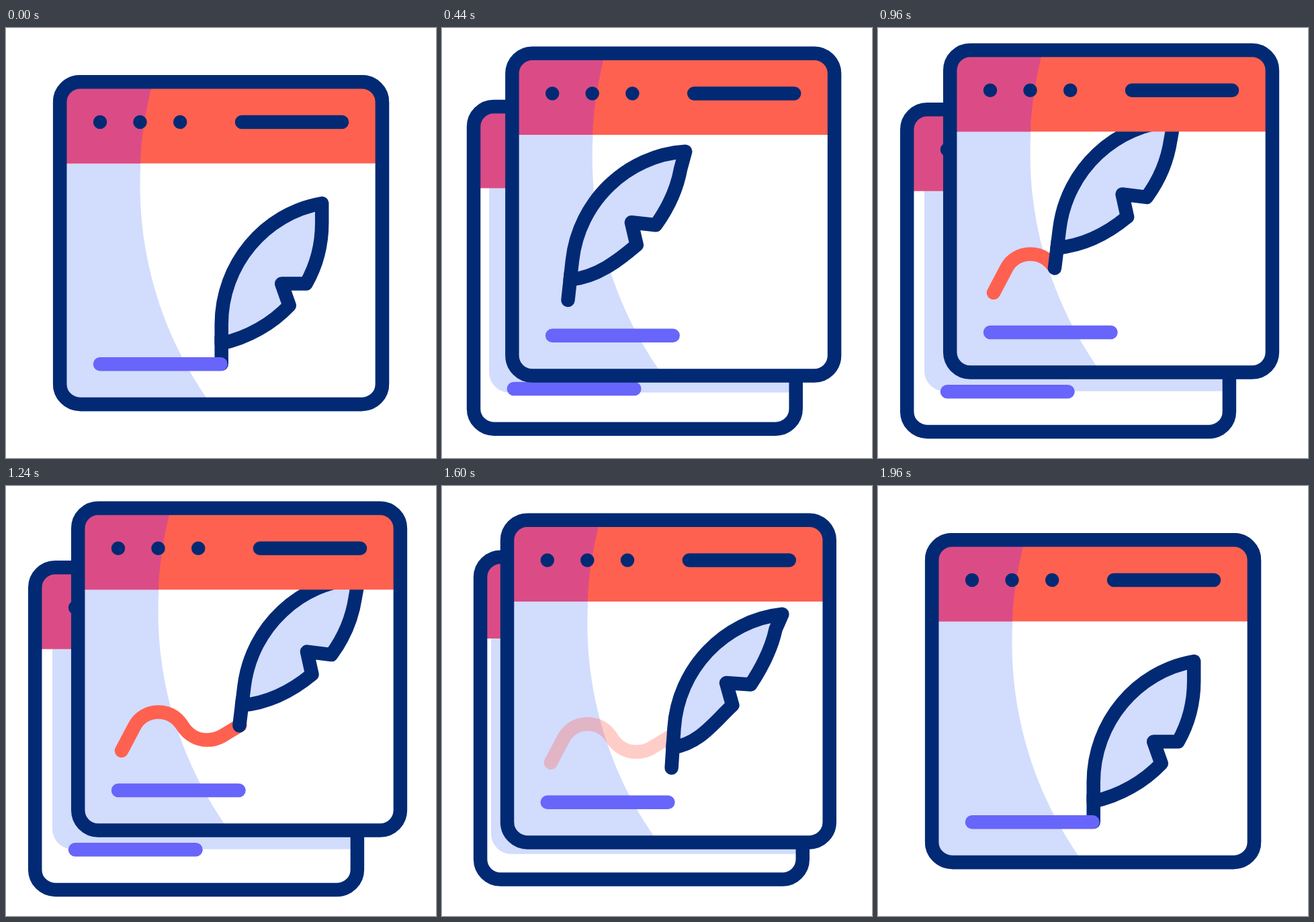
Write an HTML page that moves like this. It is 640x640 px and loops after 2000 ms.

```html
<!DOCTYPE html>
<html lang="en">
<head>
<meta charset="utf-8">
<title>Writing window</title>
<style>
  html, body { margin: 0; width: 100%; height: 100%; overflow: hidden; background: #fff; }
  svg { display: block; width: 100vw; height: 100vh; }
  .ink { stroke: #022a74; }
  .stroke { fill: none; stroke-width: 20.5; stroke-linecap: round; stroke-linejoin: round; }
  .pale { fill: #d2dcfd; }
</style>
</head>
<body>
<svg viewBox="0 0 640 640">
  <defs>
    <clipPath id="pane"><rect x="80" y="80" width="480" height="480" rx="30"/></clipPath>
    <g id="header" clip-path="url(#pane)">
      <path fill="#ff6150" d="M80 80H560V201.500H80Z"/>
      <path fill="#db4c86" d="M80 80H218.500L216 90C207 128 201 165 200 201.500H80Z"/>
    </g>
    <g id="chrome">
      <use href="#header"/>
      <path class="stroke ink" d="M140 140h0M199.500 140h0M259.200 140h0M351 140H500"/>
      <rect class="stroke ink" x="80.200" y="80.200" width="479.700" height="479.700" rx="30"/>
      <path class="stroke" stroke="#6865fa" d="M140 500.200H319.500"/>
    </g>
  </defs>

  <g id="back">
    <g clip-path="url(#pane)">
      <rect x="80" y="80" width="480" height="480" fill="#fff"/>
      <rect id="shadow" class="pale" x="80" y="80" width="480" height="480" rx="30"/>
    </g>
    <use href="#chrome"/>
  </g>

  <g id="front">
    <g clip-path="url(#pane)">
      <rect x="80" y="80" width="480" height="480" fill="#fff"/>
      <path class="pale" d="M80 80H218.500L216 90C205 138 199.500 186 199.500 235C199.500 350 236 460 298 550V560H80Z"/>
    </g>
    <path id="line" class="stroke" stroke="#ff6150" transform="translate(-27 47.300)"
      d="M172 394L191 358C198 344 212 336.500 226.500 336.500C242 336.500 254 344 262 356C270 369 283 378 299 378C307 378 315 376 322 372L360 349"/>
    <g id="pen">
      <path id="vane" class="stroke ink" style="fill:#d2dcfd"/>
      <path class="stroke ink" d="M0 0V-40"/>
    </g>
    <use href="#chrome"/>
  </g>
</svg>
<script>
  const LOOP = 2000;
  const [back, shadow, front, line, pen, vane] =
    ["back", "shadow", "front", "line", "pen", "vane"].map(id => document.getElementById(id));

  const REST = { x: 320.7, y: 500 };
  const total = line.getTotalLength();
  const first = line.getPointAtLength(0);
  const last = line.getPointAtLength(total);

  // Smooth 0..1 progress between two times
  const ease = (t, from, to) => {
    const u = Math.min(1, Math.max(0, (t - from) / (to - from)));
    return u * u * (3 - 2 * u);
  };
  const move = (el, x, y, more = "") =>
    el.setAttribute("transform", `translate(${x} ${y}) ${more}`);

  // Feather outline around the nib; (dx, dy) pulls the notched side inwards
  function featherPath(dx, dy) {
    const p = (x, y, k = 1) => `${x + dx * k} ${y + dy * k} `;
    return "M0 -30.5V-59C0 -148 64 -224 149.5 -239" +
      "L" + p(149.5, -210, 0.5) +
      "C" + p(149.5, -178, 0.75) + p(141, -146) + p(126, -119.5) +
      "L" + p(89.5, -119.5) + "L" + p(101, -87) +
      "C" + p(75.5, -60) + "39.5 -39 0 -30.5Z";
  }

  function render(t) {
    const arrive = ease(t, 120, 520);
    const spread = arrive - ease(t, 1400, 1880);
    const fx = 27 * spread, fy = -47.3 * spread;
    move(front, fx, fy);
    move(back, -37 * spread, 41 * spread);
    move(shadow, 26 * spread, -60.5 * spread);

    const drawn = total * ease(t, 544, 1360);
    line.style.strokeDasharray = `${drawn} ${total * 2}`;
    line.style.opacity = drawn > 0 ? 1 - ease(t, 1400, 1720) : 0;

    const leave = ease(t, 1380, 1840);
    const nib = line.getPointAtLength(total * ease(t, 510, 1370));
    const axis = k => REST[k] + arrive * (first[k] - REST[k]) +
      nib[k] - first[k] + leave * (REST[k] - last[k]);
    const lift = arrive - leave;
    const flap = 4 * lift * (1 - lift);
    move(pen, axis("x") - fx, axis("y") - fy, `rotate(${7 * lift})`);
    vane.setAttribute("d", featherPath(-15 * flap - 3 * lift, -11 * flap - 2 * lift));
  }

  let start;
  function tick(now) {
    start ??= now;
    render((now - start) % LOOP);
    requestAnimationFrame(tick);
  }
  render(0);
  requestAnimationFrame(tick);
</script>
</body>
</html>
```
